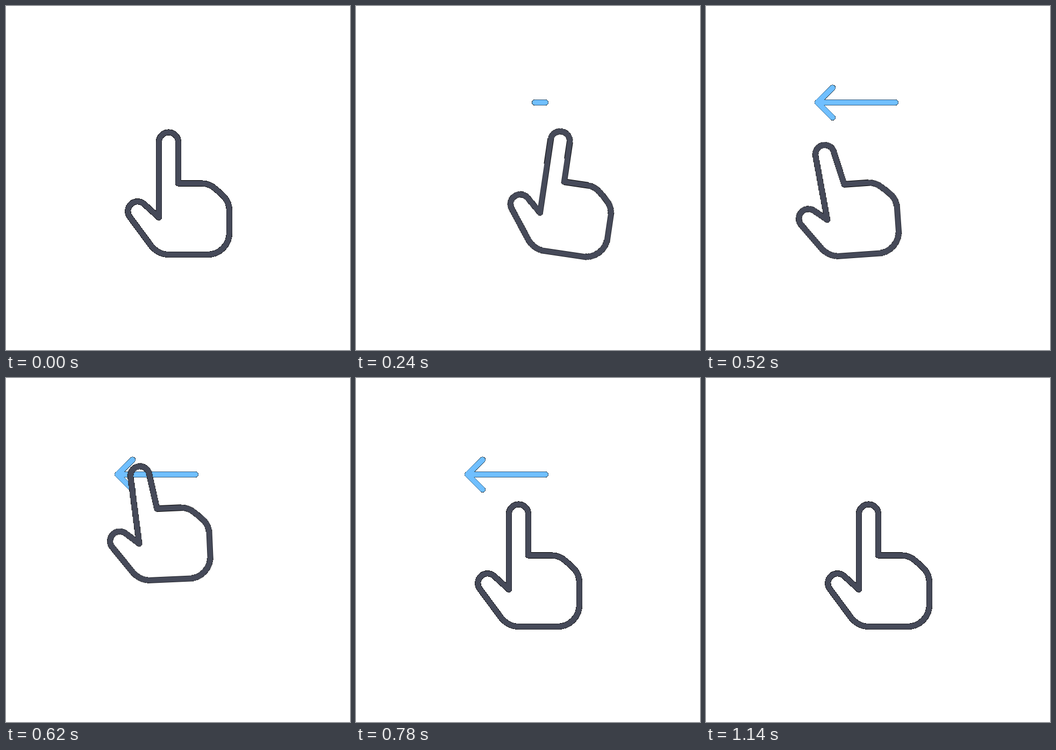
An HTML page without scripts for the animation above (1200 ms loop, 640 by 640 pixels).

```html
<!DOCTYPE html>
<html lang="en">
<head>
<meta charset="utf-8">
<title>Swipe left</title>
<style>
  html, body { margin: 0; width: 100%; height: 100%; overflow: hidden; background: #fff; }
  svg { display: block; width: 100vw; height: 100vh; }

  path { fill: none; stroke-width: 10.2; stroke-linecap: round; stroke-linejoin: round; }
  .edge path { stroke: #000; stroke-width: 11.3; shape-rendering: crispEdges; }
  .ink path { stroke: #464a59; }
  .blue path { stroke: #70bfff; }

  .arrow, .hop, .swipe, path { animation: 1.2s linear infinite; }

  /* Hand: the palm is rigid, finger and thumb bend, the whole hand swipes and hops back */
  .hop { animation-name: hop; }
  .swipe { animation-name: swipe; transform-origin: 345px 396px; }
  .palm {
    d: path("M320.5 330H364C374 330 383 334 390 340.5L403 352C411 359.5 415.5 370 415.5 381V422A40.5 40.5 0 0 1 375 462.5H303C290 462.5 278 456 270 446");
  }
  .digits { animation-name: bend; }

  @keyframes swipe {
    0%, 6.667% { transform: translate(0px, 0px) rotate(0deg); animation-timing-function: cubic-bezier(.45, 0, .66, 1); }
    25% { transform: translate(71px, 0px) rotate(10.5deg); animation-timing-function: cubic-bezier(.39, 0, .6, 1); }
    45% { transform: translate(-60.5px, 0px) rotate(-4.2deg); animation-timing-function: cubic-bezier(.37, 0, .6, 1); }
    61.667% { transform: translate(5px, 0px) rotate(.4deg); animation-timing-function: ease-in-out; }
    65%, 100% { transform: translate(0px, 0px) rotate(0deg); }
  }
  @keyframes hop {
    0%, 45% { transform: translateY(0px); animation-timing-function: ease-in-out; }
    51.667% { transform: translateY(-88px); animation-timing-function: ease-in-out; }
    60%, 100% { transform: translateY(0px); }
  }
  /* Thumb, then finger; the fingertip radius grows to half its chord, giving a semicircle */
  @keyframes bend {
    0%, 15% {
      d: path("M270 446L230.6 392.8A18 18 0 0 1 257 368.5L284.5 393.5L284.5 253A9 9 0 0 1 320.5 253L320.5 330");
      animation-timing-function: ease-in-out;
    }
    33.333% {
      d: path("M270 446L235.6 400A18 18 0 0 1 262 375.7L284.5 393.5L281.3 273A9 9 0 0 1 316.9 271L320.5 330");
      animation-timing-function: ease-in-out;
    }
    45% {
      d: path("M270 446L235.6 400A18 18 0 0 1 262 375.7L284.5 393.5L270.5 273.3A9 9 0 0 1 305.3 270.3L320.5 330");
      animation-timing-function: ease-in-out;
    }
    65%, 100% {
      d: path("M270 446L230.6 392.8A18 18 0 0 1 257 368.5L284.5 393.5L284.5 253A9 9 0 0 1 320.5 253L320.5 330");
    }
  }

  /* Arrow: the shaft grows, the head unfolds, the blue sinks into black */
  .arrow { animation-name: show; }
  .shaft { animation-name: grow; }
  .head { animation-name: unfold; }
  .blue .shaft { animation-name: grow, fade; }
  .blue .head { animation-name: unfold, fade; }

  @keyframes show {
    0%, 16.9% { visibility: hidden; }
    17%, 94.9% { visibility: visible; }
    95%, 100% { visibility: hidden; }
  }
  @keyframes grow {
    0%, 16.667% { d: path("M352.5 179.5L352.5 179.5"); animation-timing-function: cubic-bezier(.46, 0, .58, 1); }
    29.167%, 100% { d: path("M352.5 179.5L207.5 179.5"); }
  }
  @keyframes unfold {
    0%, 29.1% { d: path("M235.5 179.5L207.5 179.5L235.5 179.5"); stroke-opacity: 0; }
    29.167% {
      d: path("M235.5 179.5L207.5 179.5L235.5 179.5"); stroke-opacity: 1;
      animation-timing-function: ease-in-out;
    }
    37.5%, 100% { d: path("M235.5 152L207.5 179.5L235.5 207.5"); stroke-opacity: 1; }
  }
  @keyframes fade {
    0%, 83.333% { opacity: 1; animation-timing-function: cubic-bezier(.33, 0, .67, 1); }
    95%, 100% { opacity: 0; }
  }
</style>
</head>
<body>
<svg viewBox="0 0 640 640">
  <g class="arrow">
    <g class="edge"><path class="shaft"/><path class="head"/></g>
    <g class="blue"><path class="shaft"/><path class="head"/></g>
  </g>
  <g class="hop">
    <g class="swipe">
      <g class="edge"><path class="palm"/><path class="digits"/></g>
      <g class="ink"><path class="palm"/><path class="digits"/></g>
    </g>
  </g>
</svg>
</body>
</html>
```
